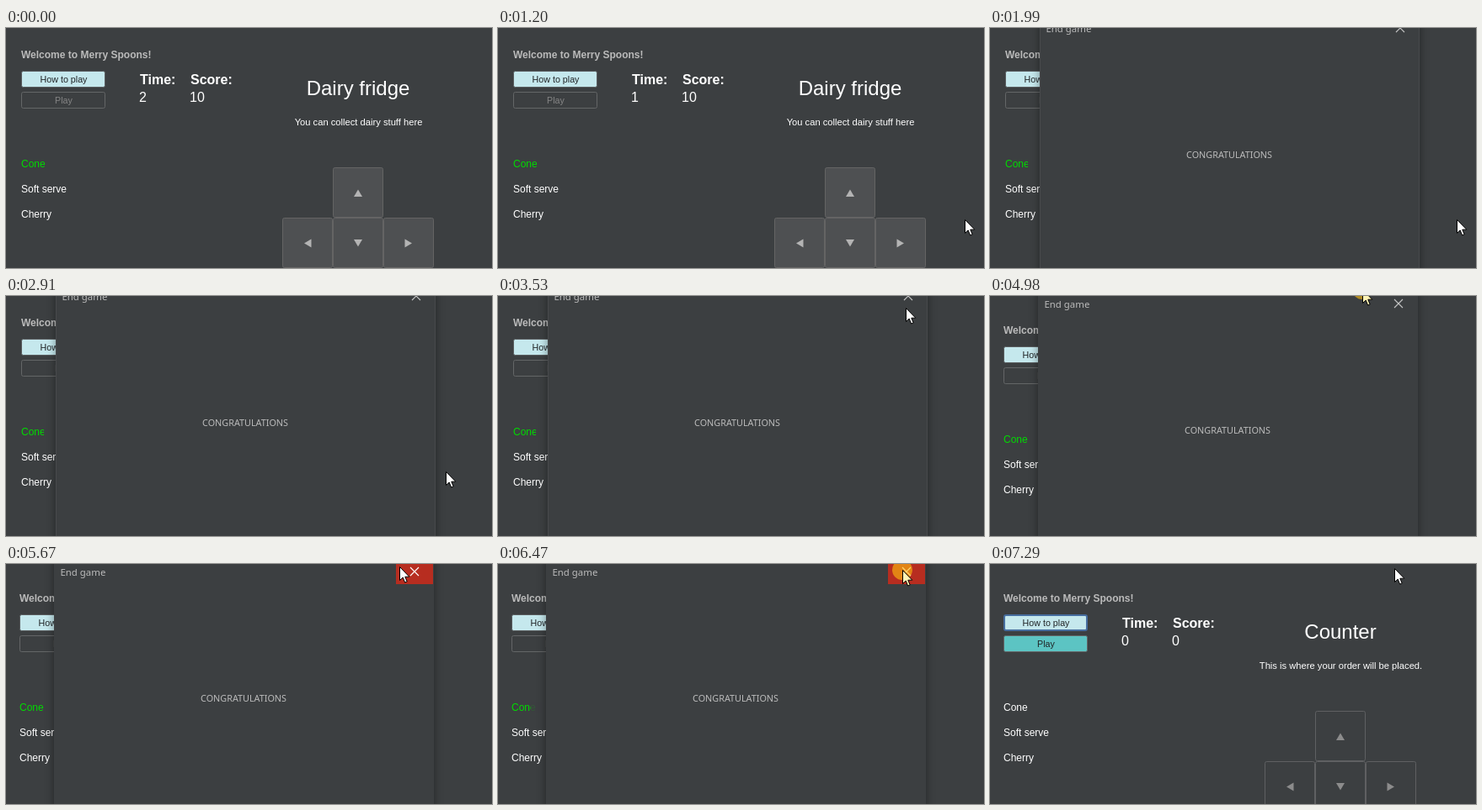
These frames come from a looping animation (577x286 px, 8 s). An HTML page with a canvas:

```html
<!DOCTYPE html>
<html lang="en">
<head>
<meta charset="utf-8">
<title>Ice cream game</title>
<style>
html, body { margin: 0; height: 100%; overflow: hidden; background: #3c3f41; }
canvas { display: block; }
</style>
</head>
<body>
<canvas id="stage" width="577" height="286"></canvas>
<script>
const ctx = document.getElementById('stage').getContext('2d');
const LOOP = 8000, STEP = 100;
const DIALOG_OPEN = 1990, DRAG = 4850, DIALOG_CLOSE = 6590;
const BG = '#3c3f41';
const ARIAL = '"Liberation Sans", Arial, sans-serif';
const NOTO = '"Noto Sans", sans-serif';

// Pointer moves: start time, number of steps, end x, end y
const moves = [
  [600, 7, 554, 228],
  [2310, 1, 554, 229], [2510, 1, 553, 229], [2710, 1, 552, 228],
  [2910, 4, 432, 150],
  [3430, 2, 484, 14], [3640, 1, 485, 11], [3850, 3, 480, 8],
  [4350, 4, 442, -8],
  [5370, 6, 480, 9], [6170, 1, 480, 7],
  [7190, 2, 480, 5]
];

function pointerAt(t) {
  let x = 492, y = 290;
  for (const [start, steps, endX, endY] of moves) {
    if (t < start) break;
    const k = Math.min(1, (Math.floor((t - start) / STEP) + 1) / steps);
    x += (endX - x) * k;
    y += (endY - y) * k;
  }
  return { x: Math.round(x), y: Math.round(y) };
}

function text(str, x, y, size, color, { bold = false, align = 'left', family = ARIAL } = {}) {
  ctx.font = `${bold ? 'bold ' : ''}${size}px ${family}`;
  ctx.textAlign = align;
  ctx.fillStyle = color;
  ctx.fillText(str, x, y);
}

function box(x, y, w, h, fill, border, line = 1) {
  ctx.beginPath();
  ctx.roundRect(x + line / 2, y + line / 2, w - line, h - line, 2);
  if (fill) {
    ctx.fillStyle = fill;
    ctx.fill();
  }
  ctx.strokeStyle = border;
  ctx.lineWidth = line;
  ctx.stroke();
}

function arrowButton(x, y, turns, active) {
  box(x, y, 60, 60, active ? '#4e5052' : null, active ? '#646464' : '#5f6062');
  ctx.save();
  ctx.translate(x + 30, y + 30.5);
  ctx.rotate(turns * Math.PI / 2);
  ctx.beginPath();
  ctx.moveTo(0, -4);
  ctx.lineTo(5, 4.5);
  ctx.lineTo(-5, 4.5);
  ctx.fillStyle = active ? '#b4b4b4' : '#8c8c8c';
  ctx.fill();
  ctx.restore();
}

function drawGame(t) {
  const over = t >= DIALOG_CLOSE;
  text('Welcome to Merry Spoons!', 18, 36, 12, '#bbbbbb', { bold: true });

  if (over) box(18, 51, 100, 20, '#c5e8ed', '#466d9f', 2);
  else box(18, 51, 100, 20, '#c5e8ed', '#5a5e60');
  text('How to play', 68.5, 65, 10.7, '#202426', { align: 'center' });
  box(18, 76, 100, 20, over ? '#5cc4c3' : null, '#646667');
  text('Play', 68.5, 90, 10.7, over ? '#202426' : '#858585', { align: 'center' });

  text('Time:', 159, 67, 16, '#fff', { bold: true });
  text('Score:', 219, 67, 16, '#fff', { bold: true });
  text(over ? '0' : t < 1000 ? '2' : '1', 158, 88, 16, '#fff');
  text(over ? '0' : '10', 218, 88, 16, '#fff');

  text(over ? 'Counter' : 'Dairy fridge', 418, 80, 24, '#fff', { align: 'center' });
  text(over ? 'This is where your order will be placed.' : 'You can collect dairy stuff here',
    418.5, 116, 11.2, '#fff', { align: 'center' });

  text('Cone', 18, 166, 12, over ? '#fff' : '#00dc00');
  text('Soft serve', 18, 196, 12, '#fff');
  text('Cherry', 18, 226, 12, '#fff');

  arrowButton(388, 166, 0, !over);
  arrowButton(328, 226, 3, !over);
  arrowButton(388, 226, 2, !over);
  arrowButton(448, 226, 1, !over);
}

function drawDialog(t, hover) {
  // The dialog's shadow hides part of the first list entry
  if (t < DRAG || t >= 6470) {
    ctx.fillStyle = t < DRAG ? BG : 'rgba(60,63,65,.85)';
    ctx.fillRect(t < DRAG ? 45 : 41, 155, 14, 13);
  }
  ctx.save();
  ctx.shadowColor = 'rgba(0,0,0,.4)';
  ctx.shadowBlur = 10;
  ctx.fillStyle = BG;
  ctx.fillRect(59, -30, 451, 400);
  ctx.restore();
  if (t < DRAG) {
    ctx.strokeStyle = '#484a4c';
    ctx.lineWidth = 1;
    ctx.strokeRect(59.5, -30.5, 450, 400);
  }

  if (hover) {
    ctx.fillStyle = '#b72d20';
    ctx.fillRect(465, -16, 44, 31);
  }
  text('End game', 66.5, 5, 11.4, '#bbbbbb', { family: NOTO });
  text('CONGRATULATIONS', 284, 155, 10.8, '#bbbbbb', { align: 'center', family: NOTO });

  ctx.beginPath();
  ctx.moveTo(482, -5);
  ctx.lineTo(492, 5);
  ctx.moveTo(492, -5);
  ctx.lineTo(482, 5);
  ctx.strokeStyle = hover ? '#fff' : '#c4c4c4';
  ctx.lineWidth = 1.1;
  ctx.stroke();
}

function clickColor(t) {
  if (t >= 4650 && t < 4980) return 'rgba(255,240,0,.6)';
  if (t >= 4980 && t < 5170 || t >= 6470 && t < DIALOG_CLOSE) return 'rgba(255,190,15,.6)';
  return null;
}

const arrow = new Path2D('M.5 .5V16.5L4.2 13L6.6 19L9.2 18L6.8 12.2H11.8Z');

function drawPointer({ x, y }, click) {
  if (click) {
    ctx.beginPath();
    ctx.arc(x, y, 12, 0, 2 * Math.PI);
    ctx.fillStyle = click;
    ctx.fill();
  }
  ctx.save();
  ctx.translate(x, y);
  ctx.fillStyle = click ? '#fff3b4' : '#fff';
  ctx.strokeStyle = '#000';
  ctx.lineWidth = 1;
  ctx.fill(arrow);
  ctx.stroke(arrow);
  ctx.restore();
}

function draw(t) {
  const pointer = pointerAt(t);
  const [dx, dy] = t < DRAG ? [0, 0] : [-2, 9];
  const hover = pointer.x >= 465 + dx && pointer.x < 509 + dx && pointer.y < 13 + dy;

  ctx.fillStyle = BG;
  ctx.fillRect(0, 0, 577, 286);
  ctx.save();
  ctx.translate(dx, dy);
  drawGame(t);
  if (t >= DIALOG_OPEN && t < DIALOG_CLOSE) drawDialog(t, hover);
  ctx.restore();
  if (t >= 600) drawPointer(pointer, clickColor(t));
}

const startTime = performance.now();
function tick() {
  draw((performance.now() - startTime) % LOOP);
  requestAnimationFrame(tick);
}
tick();
</script>
</body>
</html>
```
